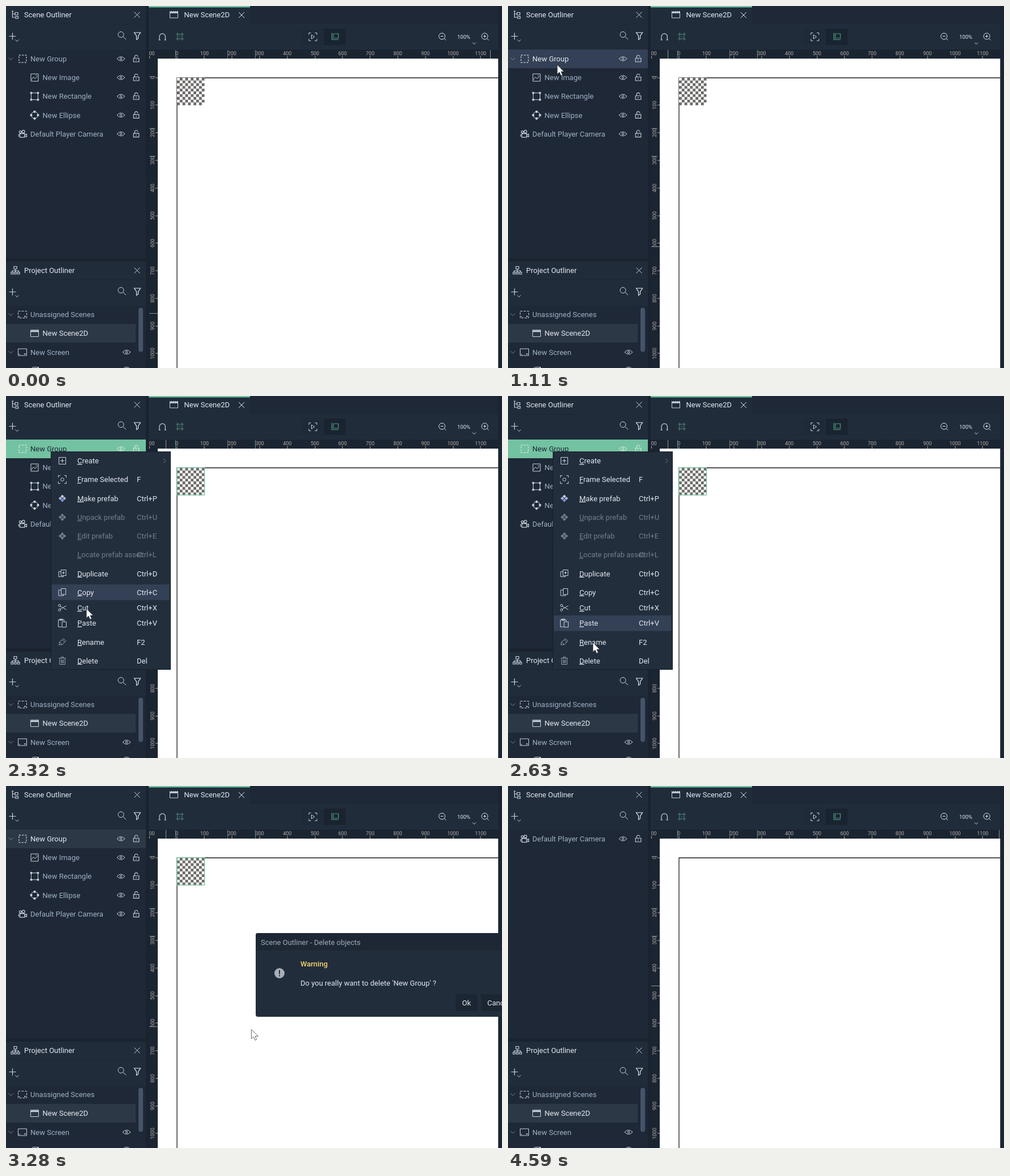
Recreate the animation shown at these times as an HTML page. Size 876 px wide and 640 px high, loop 4.71 s.

```html
<!DOCTYPE html>
<html lang="en">
<head>
<meta charset="utf-8">
<title>Scene editor</title>
<style>
html, body { margin: 0; width: 100%; height: 100%; overflow: hidden; background: #1a232f; }
svg { display: block; width: 876px; height: 640px; }
text { font-family: Roboto, "Open Sans", sans-serif; white-space: pre; }
</style>
</head>
<body>
<svg id="stage" viewBox="0 0 876 640" xmlns="http://www.w3.org/2000/svg"></svg>
<script>
const C = {
  gap: '#1a232f', head: '#212c3b', list: '#1e2836', ruler: '#1b2532',
  hover: '#344056', idle: '#2d3847', green: '#73c2a1', text: '#9fb0c4',
  bright: '#e2e8ef', icon: '#cbd3dc', dim: '#727e8d', num: '#b3aaa5', mark: '#8b9490'
};

const rect = (x, y, w, h, fill, more = '') =>
  `<rect x="${x}" y="${y}" width="${w}" height="${h}" fill="${fill}" ${more}/>`;
const text = (x, y, s, fill = C.text, size = 13, more = '') =>
  `<text x="${x}" y="${y + size * .355}" font-size="${size}" fill="${fill}" ${more}>${s}</text>`;
const path = (x, y, d, color = C.icon, more = '') =>
  `<path transform="translate(${x} ${y})" d="${d}" fill="none" stroke="${color}" ${more}/>`;
const solid = (x, y, d, color = C.icon) =>
  `<path transform="translate(${x} ${y})" d="${d}" fill="${color}"/>`;
const ring = r => `M${-r} 0a${r} ${r} 0 1 0 ${2 * r} 0a${r} ${r} 0 1 0 ${-2 * r} 0Z`;
const box = (x, y, w, h = w) => `M${x} ${y}h${w}v${h}h${-w}Z`;
const corners = r => [[-r, -r], [r, -r], [-r, r], [r, r]].map(([x, y]) => box(x - 1.3, y - 1.3, 2.6)).join('');
const diamond = (x, y) => `M${x} ${y - 3}l3 3l-3 3l-3-3Z`;

const D = {
  close: 'M-5-5L5 5M5-5L-5 5',
  plus: 'M-6 0H6M0-6V6',
  drop: 'M-3-1.5L0 1.5L3-1.5',
  fold: 'M-4-2L0 2L4-2',
  next: 'M-2-4L2 0L-2 4',
  search: 'M-7-2a5 5 0 1 0 10 0a5 5 0 1 0-10 0M1.6 1.6L7 6.5',
  funnel: 'M-5.5-6H5.5L1.5 0V4.5L-1.5 6.5V0Z',
  eye: 'M-7 0Q0-7.4 7 0Q0 7.4-7 0Z' + ring(1.7),
  lock: 'M-4.8-1H4.8V5.5H-4.8ZM-2.8-1V-3.5a2.8 2.8 0 0 1 5.6 0M0 1.3V3.3',
  frame: 'M-7-3.5V-7H-3.5M3.5-7H7V-3.5M7 3.5V7H3.5M-3.5 7H-7V3.5'
};

const ICONS = {
  group: (x, y) => path(x, y, box(-6.5, -6.5, 13), C.icon, 'stroke-dasharray="3.2 2" stroke-width="1.2"'),
  image: (x, y) => path(x, y, box(-6.5, -6.5, 13) + 'M-6 4L-2-1L1 2L5-3M2-4h1.5') ,
  rect: (x, y) => path(x, y, box(-6, -6, 12)) + solid(x, y, corners(6)),
  ellipse: (x, y) => path(x, y, ring(6)) +
    solid(x, y, [[-6, 0], [6, 0], [0, -6], [0, 6]].map(([a, b]) => box(a - 1.4, b - 1.4, 2.8)).join('')),
  camera: (x, y) => path(x, y, 'M-5-.5H3.5V6H-5ZM3.5 2L7 .3V5.3L3.5 3.7M-7 .5V5M-6.2-3.5a2 2 0 1 0 4 0a2 2 0 1 0-4 0M-1.2-4a2.4 2.4 0 1 0 4.8 0a2.4 2.4 0 1 0-4.8 0', C.icon, 'stroke-width="1.2"'),
  scene: (x, y) => path(x, y, box(-7, -5.5, 14, 11.5)) +
    solid(x, y, box(-7.5, -6, 15, 3.8)) +
    path(x, y - 5.4, 'M-6.5 0H7', C.list, 'stroke-width="1.3" stroke-dasharray="1.3 2"'),
  screen: (x, y, dash = '') => path(x, y, box(-7.5, -6, 15, 12), C.icon, dash) +
    solid(x, y, box(3, 2.5, 3, 1.6) + box(-6, 3, 1.5, 1.5))
};

function panel(y, title, bottom) {
  return rect(0, y, 247, bottom - y, C.list) + rect(0, y, 247, 78, C.head) +
    rect(0, y + 31, 247, 1, '#1c2634') +
    text(32, y + 15.5, title, C.bright) +
    path(231.5, y + 15.5, D.close) +
    path(11.5, y + 53.5, D.plus, C.icon, 'stroke-width="1.2"') + path(19.5, y + 61, D.drop) +
    path(205, y + 52.5, D.search) + path(232, y + 53, D.funnel, C.bright, 'stroke-width="1.2"');
}

const ROW = 33.2;
const rows = [['New Group', 'group', 0], ['New Image', 'image', 1], ['New Rectangle', 'rect', 1],
  ['New Ellipse', 'ellipse', 1], ['Default Player Camera', 'camera', 0]];

function row([name, kind, deep], i) {
  const y = 93.3 + i * ROW;
  return `<g class="row">` + rect(0, 77 + i * ROW, 247, 33, C.hover, 'class="back"') +
    (i ? '' : path(8.5, y, D.fold, '#7d8a99', 'class="fold"')) +
    `<g class="icon">${ICONS[kind](deep ? 50.5 : 29.5, y)}</g>` +
    text(deep ? 64.5 : 43, y, name, C.text, 13, 'class="name"') +
    path(203, y, D.eye) + path(230, y, D.lock, C.icon, 'stroke-width="1.1"') + '</g>';
}

function project() {
  return rect(0, 562, 229, 33, C.idle) +
    path(8.5, 545.5, D.fold, '#7d8a99') + ICONS.screen(29, 545.5, 'stroke-dasharray="4 2"') +
    text(43, 545.5, 'Unassigned Scenes') +
    ICONS.scene(50.5, 578.5) + text(64.5, 578.5, 'New Scene2D', C.bright) +
    path(8.5, 612, D.fold, '#7d8a99') + ICONS.screen(29, 612) + text(43, 612, 'New Screen') +
    path(213, 612, D.eye) + path(213, 642, D.eye) +
    path(50.5, 645, 'M-6.5 0V-3.5L-3-6.5H7V0M-6.5-3.5H4V0M4-3.5L7-6.5') +
    rect(234, 533.5, 8, 78, '#465469', 'rx="4"');
}

function rulers() {
  let s = rect(252, 77, 617, 16, C.ruler) + rect(252, 77, 16, 563, C.ruler);
  s += text(252.5, 84, '00', C.num, 9) + rect(253, 88.5, 1, 4.5, C.num);
  for (let i = 0; i < 12; i++) {
    const p = i * 48.78, x = 301.7 + p, y = 126.6 + p;
    s += text(x, 84, i * 100, C.num, 9, 'text-anchor="middle"') + rect(Math.round(x) - .5, 88.5, 1, 4.5, C.num);
    if (i < 11) s += `<g transform="translate(258.5 ${y}) rotate(-90)">` +
      text(0, 0, i * 100, C.num, 9, 'text-anchor="middle"') + '</g>' + rect(264, Math.round(y) - .5, 4, 1, C.num);
  }
  for (const p of [299, 391, 440]) s += rect(p, 78, 1, 15, p == 391 ? '#6f7a80' : '#5f8c80');
  for (const p of [124, 216, 265]) s += rect(253, p, 11, 1, p == 124 ? '#6f7a80' : '#5f8c80');
  return s + rect(0, 77.5, 1, 15.5, C.mark, 'id="markX"') + rect(253, 0, 15, 1, C.mark, 'id="markY"');
}

function board() {
  let cells = '';
  const c = 4.86;
  for (let j = 0; j < 10; j++)
    for (let i = 0; i < 10; i++)
      if ((i + j) % 2) cells += box(302 + i * c, 126.8 + j * c, c);
  return rect(268, 93, 601.5, 547, '#fff') +
    path(0, 0, 'M869.5 127H302V640', '#1c1c1c', 'stroke-width="1.3"') +
    `<g id="object">${rect(302, 126.8, 48.6, 48.6, '#fff')}${solid(0, 0, cells, '#6c6a69')}` +
    rect(302, 126.8, 48.6, 48.2, 'none', `id="outline" stroke="${C.green}" stroke-width="1.3"`) + '</g>';
}

function toolbar() {
  const lens = 'M4 4L7 7' + ring(5.5);
  return rect(252, 0, 617.5, 30, C.list) + rect(252, 0, 179, 31, C.head) + rect(252, 0, 179, 2.5, C.green) +
    rect(252, 30, 617.5, 47, C.head) + rect(431, 30, 438, 1, '#1c2634') +
    ICONS.scene(296.5, 15) + text(314.5, 15.5, 'New Scene2D', C.bright) + path(416, 16, D.close, C.bright) +
    path(276, 54, 'M-5 6V0a5.2 5.2 0 0 1 10.4 0V6M-6.5 6H-3M3.5 6H7', C.icon, 'stroke-width="1.2"') +
    path(307, 54, 'M-7-4H7M-7 4H7M-4-7V7M4-7V7M-1 0H1', '#4f8c7a') +
    rect(522, 40, 38, 29, '#1f2a38') + rect(561, 40, 39, 29, '#1a2431') +
    path(542, 54.5, D.frame) + path(542, 54.5, 'M-2.5-3.5L3 0L-2.5 3.5Z') +
    path(580.5, 54.5, 'M-5-7V5H7M-2.5-5.5H6.5V2.5H-2.5Z', '#4f9a82', 'stroke-width="1.2"') +
    path(770, 53.5, lens + 'M-2.5 0H2.5', C.bright) + path(845.5, 53.5, lens + 'M-2.5 0H2.5M0-2.5V2.5', C.bright) +
    text(808.5, 55, '100%', C.bright, 9.5, 'text-anchor="middle"') + path(827, 66, D.drop);
}

const items = [
  ['Create', '', 114.5, 1], ['Frame Selected', 'F', 147.7, 1], ['Make prefab', 'Ctrl+P', 181, 1],
  ['Unpack prefab', 'Ctrl+U', 214.3, 0], ['Edit prefab', 'Ctrl+E', 247.5, 0], ['Locate prefab asset', 'Ctrl+L', 280.7, 0],
  ['Duplicate', 'Ctrl+D', 314, 1], ['Copy', 'Ctrl+C', 347, 1], ['Cut', 'Ctrl+X', 374.3, 1],
  ['Paste', 'Ctrl+V', 401.7, 1], ['Rename', 'F2', 435, 1], ['Delete', 'Del', 468, 1]];
const glyphs = [
  box(-6, -6, 12) + 'M-3.5 0H3.5M0-3.5V3.5', D.frame + ring(2.8), '', '', '', '',
  box(-2.5, -6.5, 9, 10) + 'M-2.5-3.5H-6.5V5.5H2V3.5M-.5-1.5H4.5M2-4V1',
  box(-2, -6.5, 8, 10.5) + 'M-2-4H-6.5V6H2V4',
  'M-4.5-3L7 3.5M-4.5 3L7-3.5M-7-4a2 2 0 1 0 4 0a2 2 0 1 0-4 0M-7 4a2 2 0 1 0 4 0a2 2 0 1 0-4 0',
  'M-1 6.5H-7V-6H3V-3M-4.5-7.5H.5V-5H-4.5ZM-.5-2.5H7V7H-.5Z',
  'M-6 5L-5 0L2-6L6-2L0 4.5ZM-5 0L0 4.5M0-4L4 0',
  'M-6-4.5H6M-2-4.5V-6.5H2V-4.5M-4.8-4.5V6.5H4.8V-4.5M-2-2V4.5M0-2V4.5M2-2V4.5'];

function menu() {
  let s = rect(79.5, 98.5, 211, 385, '#232e3d', 'stroke="#161e28"') +
    rect(81, 0, 207.5, 27.5, C.hover, 'id="menuHover"');
  items.forEach(([name, key, y, on], i) => {
    const color = on ? C.bright : C.dim;
    s += text(126, y, `<tspan text-decoration="underline">${name[0]}</tspan>${name.slice(1)}`, color) + text(231, y, key, color);
    if (i > 1 && i < 5) {
      const tint = on ? '#a9b4e6' : C.dim;
      s += solid(99.5, y, diamond(-3.6, 0) + diamond(3.6, 0), tint) + solid(99.5, y, diamond(0, -3.6), on ? '#c9cfda' : C.dim) +
        solid(99.5, y, diamond(0, 3.6), on ? '#8497e0' : C.dim);
    } else s += path(99.5, y, glyphs[i], i > 9 ? '#98a3b0' : C.icon);
  });
  return `<g id="menu">${s}${path(280, 114.5, D.next, C.dim)}</g>`;
}

function dialog() {
  return '<g id="dialog">' + rect(441, 260, 460, 148, '#222d3c', 'rx="4"') +
    solid(441, 260, 'M0 31V4a4 4 0 0 1 4-4H440V31Z', '#1e2835') +
    text(450, 276, 'Scene Outliner - Delete objects', '#a0abb9') +
    solid(483, 331, ring(9), '#a8afb7') + rect(482, 325.5, 2, 7, '#222d3c') + rect(482, 334.3, 2, 2.2, '#222d3c') +
    text(520, 314.5, 'Warning', '#f6d868', 13, 'font-weight="500"') +
    text(520, 348.5, "Do you really want to delete 'New Group' ?", C.bright) +
    rect(794, 368, 39, 30, '#1c2633') + rect(839, 368, 60, 30, '#1c2633', 'id="cancel"') +
    text(805.5, 383.5, 'Ok', C.bright) + text(850, 383.5, 'Cancel', C.bright) + '</g>';
}

const stage = document.getElementById('stage');
stage.innerHTML = rect(0, 0, 876, 640, C.gap) + panel(0, 'Scene Outliner', 446) +
  path(16, 15, 'M-6-6H-2.5M-4.5-6V5H0M-4.5-1H0M0-3.5H5V1H0ZM1 3.5H5.5V7H1Z', C.icon, 'stroke-width="1.2"') +
  rows.map(row).join('') + panel(452, 'Project Outliner', 640) +
  path(16.5, 467.5, 'M-2.5-7H2.5V-2.5H-2.5ZM0-2.5V3M-5.5 3V.5H5.5V3M-7.5 3H-4V6.5H-7.5ZM-1.7 3H1.7V6.5H-1.7ZM4 3H7.5V6.5H4Z', C.icon, 'stroke-width="1.2"') +
  project() + toolbar() + board() + rulers() + rect(869.5, 0, 6.5, 640, C.ruler) + menu() + dialog() +
  '<circle id="press" r="13" fill="#c9bd0c" fill-opacity=".75"/>' +
  '<path id="cursor" d="M0 0V16.5L3.8 13L6.5 19L9.3 17.8L6.7 12H12Z" fill="#fff" stroke="#20262e" stroke-width=".7"/>';

const $ = id => document.getElementById(id);
const show = (id, on) => $(id).setAttribute('display', on ? 'inline' : 'none');
const set = (node, o) => { for (const k in o) node.setAttribute(k, o[k]); };
const rowNodes = [...document.querySelectorAll('.row')];

const LOOP = 4710;
const ticks = [0, 110, 210, 310, 400, 500, 600, 710, 810, 910, 1010, 1110, 1220, 1330, 1450, 1570, 1690,
  1880, 1990, 2100, 2210, 2320, 2430, 2530, 2630, 2730, 2830, 2930, 3060, 3170, 3270, 3380, 3490,
  3590, 3690, 3800, 3900, 4010, 4120, 4240, 4390, 4490, 4590];

// Pointer path: time, x, y.
const way = [[0, 855, 543], [110, 842, 541], [310, 545, 488], [500, 282, 425], [600, 144, 269],
  [910, 103, 150], [1110, 87, 104], [1220, 80, 99], [1330, 79, 98], [1690, 79, 98], [1880, 82, 108],
  [2210, 129, 340], [2320, 142, 376], [2630, 150, 436], [2830, 155, 464], [2930, 155, 466], [3060, 155, 466],
  [3170, 200, 458], [3380, 690, 400], [3490, 846, 378], [3590, 854, 376], [3690, 850, 377],
  [4010, 817, 383], [4240, 817, 383], [4390, 834, 372], [4490, 850, 362], [4590, 867, 353], [LOOP, 867, 353]];

function at(t) {
  const i = Math.max(1, way.findIndex(k => k[0] >= t));
  const [a, ax, ay] = way[i - 1], [b, bx, by] = way[i];
  const u = (t - a) / (b - a);
  return [ax + (bx - ax) * u, ay + (by - ay) * u];
}

function draw(time) {
  const t = ticks.findLast(k => k <= time);
  const [x, y] = at(t);
  const within = (a, b) => t >= a && t < b;

  const chosen = within(1450, 3170), idle = within(3170, 4390), gone = t >= 4390;
  const over = within(710, 1450) ? Math.floor((y - 77) / ROW) : -1;
  rowNodes.forEach((node, i) => {
    const green = chosen && !i, lit = i == over, grey = idle && !i;
    set(node, { display: gone && i < 4 ? 'none' : 'inline', transform: `translate(0 ${gone ? -4 * ROW : 0})` });
    set(node.querySelector('.back'), { display: green || lit || grey ? 'inline' : 'none', fill: green ? C.green : lit ? C.hover : C.idle });
    set(node.querySelector('.name'), { fill: green ? '#1d2936' : lit || grey ? C.bright : C.text });
    if (!i) show2(node.querySelector('.fold'), !green);
    node.querySelectorAll('path:not(.fold)').forEach(p => set(p, { stroke: green ? '#d3efe3' : C.icon }));
  });

  show('object', t < 4240);
  show('outline', within(1450, 4240));

  const [mx, my] = within(500, 4390) ? [282, 425] : [x, y];
  $('markX').setAttribute('x', Math.round(mx));
  $('markY').setAttribute('y', Math.round(my));

  show('menu', within(1690, 3170));
  $('menu').setAttribute('opacity', t < 1880 ? .33 : 1);
  // The highlight trails the pointer slightly.
  const hy = at(Math.max(0, t - 100))[1];
  const item = items.reduce((a, b) => Math.abs(b[2] - hy) < Math.abs(a[2] - hy) ? b : a);
  show('menuHover', t >= 1990 && item[3]);
  $('menuHover').setAttribute('y', item[2] - 13.8);

  show('dialog', within(3170, 4240));
  $('cancel').setAttribute('fill', x >= 839 && y > 368 && y < 398 ? C.hover : '#1c2633');

  show('press', within(1330, 1570) || within(3060, 3170) || within(4120, 4240));
  show('cursor', within(110, 4590));
  set($('press'), { cx: x, cy: y });
  set($('cursor'), { transform: `translate(${x} ${y})` });
}

function show2(node, on) { node.setAttribute('display', on ? 'inline' : 'none'); }

const start = performance.now();
function loop(now) {
  draw(Math.max(0, now - start) % LOOP);
  requestAnimationFrame(loop);
}
draw(0);
requestAnimationFrame(loop);
</script>
</body>
</html>
```
